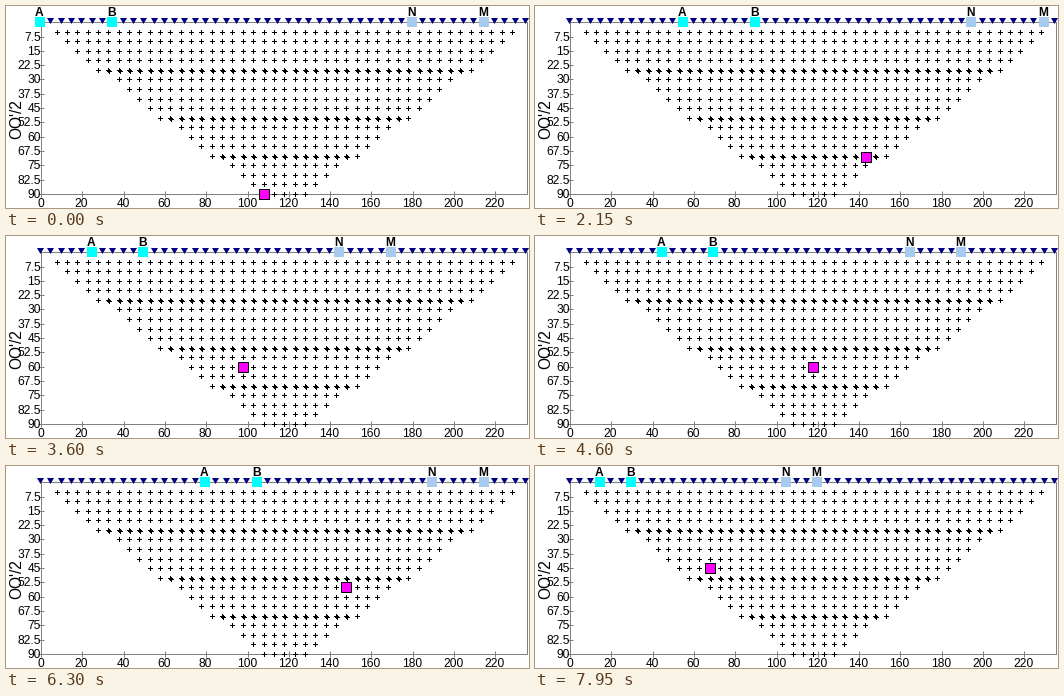
Write a matplotlib script that moves like this. It is 523 by 202 pixels and loops after 8 s.

```python
import matplotlib.pyplot as plt
from matplotlib.animation import FuncAnimation
from matplotlib.collections import PolyCollection
from matplotlib.patches import Rectangle

W, H, DPI = 523, 202, 100
PX = 72 / DPI                      # points per pixel
ELECTRODES, FRAMES = 48, 160
GRAY = "#808080"
# dipole length, deepest and shallowest level
SERIES = [(7, 90, 70), (5, 70, 50), (3, 50, 25), (1, 25, 5)]
SHARED = [(size, low) for size, _, low in SERIES[:-1]]

plt.rcParams["font.family"] = "Liberation Sans"


def electrode_x(i):
    return round(34 + 10.32 * i)


def depth_y(depth):
    return round(16.2 + 1.909 * depth)


def point_xy(a, size, depth):
    """Pixel of a reading; levels met by two series are nudged apart."""
    mid = a + (size + 2 * depth / 5) / 2
    nudge = (size, depth) in SHARED
    return round(35 + 10.35 * mid) + nudge, depth_y(depth) + nudge


def survey(size, deepest, shallowest):
    """Yield (A, dipole length, depth) in measuring order."""
    for a in range(ELECTRODES):
        for depth in range(deepest, shallowest - 1, -5):
            if a + size + 2 * depth // 5 < ELECTRODES:
                yield a, size, depth


shots = [s for series in SERIES for s in survey(*series)]

# data coordinates are pixels, whole numbers being pixel edges
fig = plt.figure(figsize=(W / DPI, H / DPI), dpi=DPI, facecolor="white")
ax = fig.add_axes([0, 0, 1, 1])
ax.set_xlim(0, W)
ax.set_ylim(H, 0)
ax.axis("off")


def line(xs, ys):
    ax.plot(xs, ys, color=GRAY, lw=PX, solid_capstyle="butt", zorder=1)


def text(x, y, s, size=12, **kw):
    return ax.text(x, y, s, fontsize=size * PX, color="black", **kw)


# frame, ticks and labels
line([35, 521, 521, 35, 35], [16, 16, 188, 188, 16])
for k in range(1, 13):
    y = depth_y(7.5 * k)
    line([32, 38], [y, y])
    text(35, y + 4, f"{7.5 * k:g}", ha="right", va="baseline")
for v in range(0, 221, 20):
    x = round(35 + 2.065 * v)
    line([x, x], [185, 191])
    text(x - 0.5, 201, str(v), ha="center", va="baseline")
text(10.5, 113.5, "OO'/2", 15.5, rotation=90, ha="center", va="center")

# electrodes
tips = [electrode_x(i) + 0.5 for i in range(ELECTRODES)]
ax.add_collection(PolyCollection(
    [[(x - 3.5, 12), (x + 3.5, 12), (x, 18)] for x in tips],
    facecolor="#000080", lw=0, zorder=2))

# readings as five-pixel crosses
xs, ys = [], []
gap = float("nan")
for shot in shots:
    x, y = point_xy(*shot)
    xs += [x - 2, x + 3, gap, x + 0.5, x + 0.5, gap]
    ys += [y + 0.5, y + 0.5, gap, y - 2, y + 3, gap]
ax.plot(xs, ys, color="black", lw=PX, solid_capstyle="butt", snap=False,
        zorder=3)

# moving parts
marks = []
for name, color in zip("ABNM", ["#00ffff", "#00ffff", "#a6caf0", "#a6caf0"]):
    box = ax.add_patch(Rectangle((0, 11), 10, 10, fc=color, lw=0, zorder=4))
    label = text(0, 10.3, name, weight="bold", ha="center", va="baseline",
                 zorder=5)
    marks.append((box, label))
spot = ax.add_patch(Rectangle((0, 0), 10, 10, fc="#ff00ff", ec="black",
                              lw=PX, joinstyle="miter", zorder=6))


def draw(frame):
    a, size, depth = shots[frame]
    m = a + size + 2 * depth // 5
    for (box, label), i in zip(marks, (a, a + size, m - size, m)):
        x = electrode_x(i)
        box.set_x(x - 5)
        label.set_x(x - 0.5)
    x, y = point_xy(a, size, depth)
    spot.set_xy((x - 5, y - 5))
    return [spot]


anim = FuncAnimation(fig, draw, frames=FRAMES, interval=50, repeat=True,
                     repeat_delay=0, blit=False)
plt.show()
```
